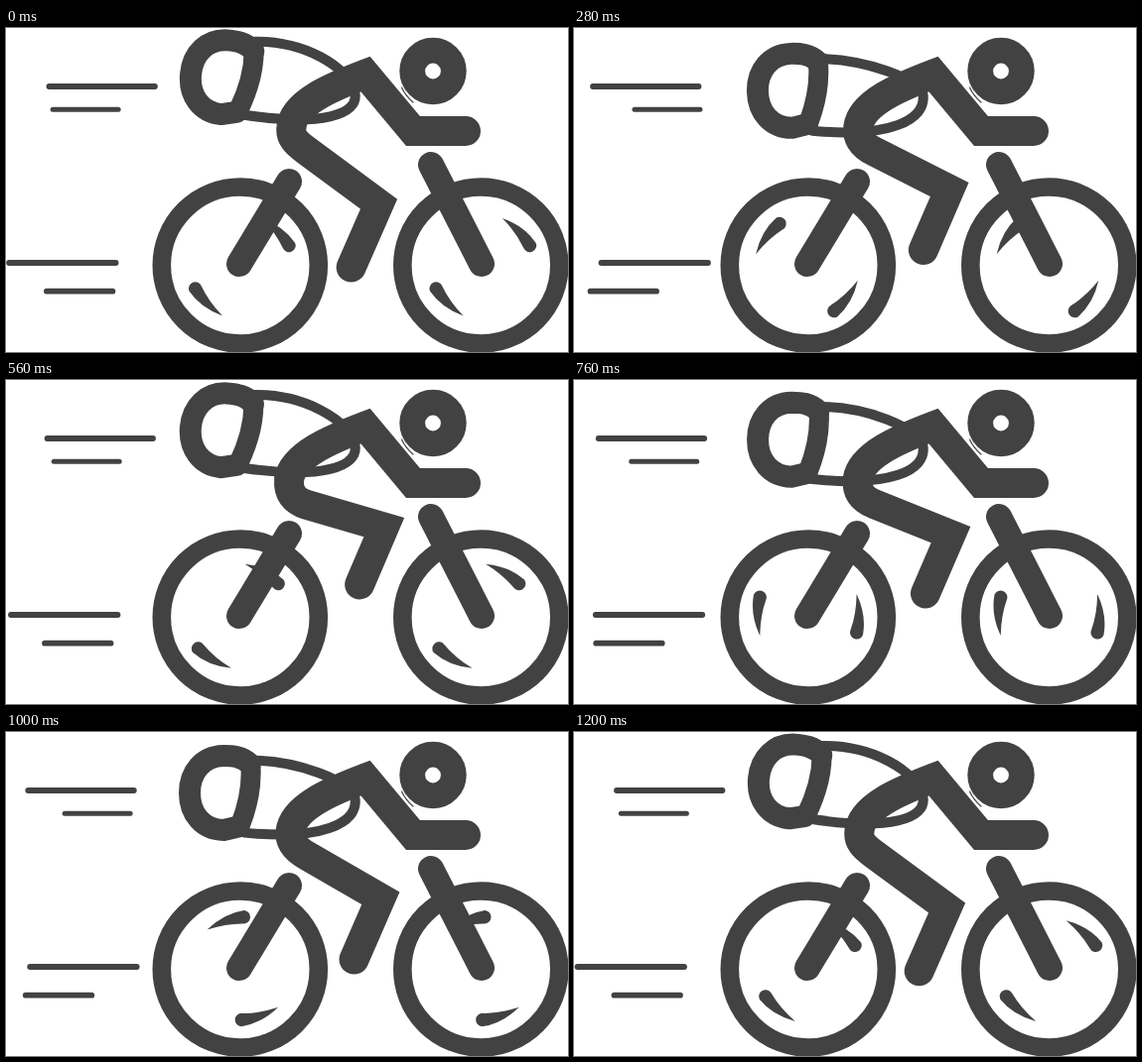
An HTML page that plays this animation: 566 by 327 pixels, repeating every 1.24 s.

```html
<!DOCTYPE html>
<html lang="en">
<head>
<meta charset="utf-8">
<title>Cyclist</title>
<style>
  html, body { margin: 0; width: 100%; height: 100%; overflow: hidden; background: #fff; }
  svg { display: block; }
  .line { fill: none; stroke: #424242; stroke-linecap: round; }
  .solid { fill: #424242; }
</style>
</head>
<body>
<svg width="566" height="327" viewBox="0 0 566 327">
  <defs>
    <path id="glint" class="solid" d="M45.2-2A6.7 6.7 0 1 0 58.6-2Q54.5-22 37-38Q44.5-19 45.2-2Z"/>
    <g id="glints">
      <use href="#glint"/>
      <use href="#glint" transform="rotate(180)"/>
    </g>
  </defs>

  <g class="line" stroke-width="5.8">
    <path class="streak" d="M44.5 59H151"/>
    <path class="streak" d="M46.5 82.3H112.5" stroke-width="5"/>
    <path class="streak" d="M2 237H109.5"/>
    <path class="streak" d="M42 265.7H108.5"/>
  </g>

  <g class="line" stroke-width="18.6">
    <circle cx="235.8" cy="239.5" r="79"/>
    <circle cx="478.3" cy="239.5" r="79"/>
  </g>
  <g transform="translate(236 239.5)"><use class="spin" href="#glints"/></g>
  <g transform="translate(478.5 239.5)"><use class="spin" href="#glints"/></g>
  <path class="line" stroke-width="26" d="M285 155L235 238M428 138L479 238"/>

  <g id="bag" class="line" stroke-linejoin="round">
    <path stroke-width="22" d="M246 32C238 24 228 23.5 219 23.5C198 24 185 40 185 61C185 82 198 98 219 98.5L234 95"/>
    <path stroke-width="20" d="M246.5 33C248 55 243 75 236 93"/>
  </g>
  <path id="strap" class="line" stroke-width="10"/>

  <circle class="line" stroke-width="25.8" cx="430" cy="43.5" r="20.8"/>
  <path class="line" stroke-width="1.2" d="M398.5 60Q402 68 410 75"/>
  <path id="rider" class="line" stroke-width="30" stroke-linejoin="miter"/>
</svg>
<script>
  const LOOP = 1240, STEP = 40;
  const START = -8, TOP = 582, END = 1212;   // foot lowest, highest, lowest

  const bag = document.getElementById('bag');
  const strap = document.getElementById('strap');
  const rider = document.getElementById('rider');
  const spins = document.querySelectorAll('.spin');
  const streaks = document.querySelectorAll('.streak');
  const reach = [-25.5, 14.5, 25.5, -25.5];

  const mix = (a, b, k) => (a + (b - a) * k).toFixed(2);
  const pt = (x0, y0, x1, y1, k) => mix(x0, x1, k) + ' ' + mix(y0, y1, k) + ' ';

  function riderPath(k) {
    return 'M463 104H410L362 46.5C328 59.5 289.5 75.5 ' + pt(287.5, 100, 285, 100, k) +
      'C' + pt(286, 110, 284, 114, k) + pt(292, 116, 290, 122, k) + pt(303, 124, 303, 126, k) +
      'L' + pt(375.5, 178, 381, 147.5, k) +
      'L' + pt(347.5, 242, 356.5, 205, k);
  }

  function strapPath(k) {
    return 'M' + pt(250, 13, 250, 28, k) +
      'C' + pt(300, 12, 295, 29, k) + pt(345, 38, 345, 48, k) + pt(351.5, 66, 351.5, 67, k) +
      'C' + pt(355, 87, 355, 92, k) + pt(318, 99, 318, 109, k) + pt(240, 87, 240, 101, k);
  }

  function draw(t) {
    const rising = t < TOP;
    const p = rising ? (t - START) / (TOP - START) : (t - TOP) / (END - TOP);
    const lift = Math.min(1, Math.max(0, rising ? p : 1 - p));
    const sway = Math.abs(Math.sin(Math.PI * p));
    const sag = sway * 1.2;
    const angle = 157.5 + 0.2958 * t;

    rider.setAttribute('d', riderPath(lift));
    strap.setAttribute('d', strapPath(sag));
    bag.setAttribute('transform', `rotate(${5.2 * (1 - sag)} 350 66)`);
    spins.forEach(s => s.setAttribute('transform', `rotate(${angle}) translate(-1 -2.3)`));
    streaks.forEach((s, i) => s.setAttribute('transform', `translate(${reach[i] * sway} 0)`));
  }

  const t0 = performance.now();
  function tick() {
    const t = (performance.now() - t0) % LOOP;
    draw(Math.floor(t / STEP) * STEP);
    requestAnimationFrame(tick);
  }
  tick();
</script>
</body>
</html>
```
